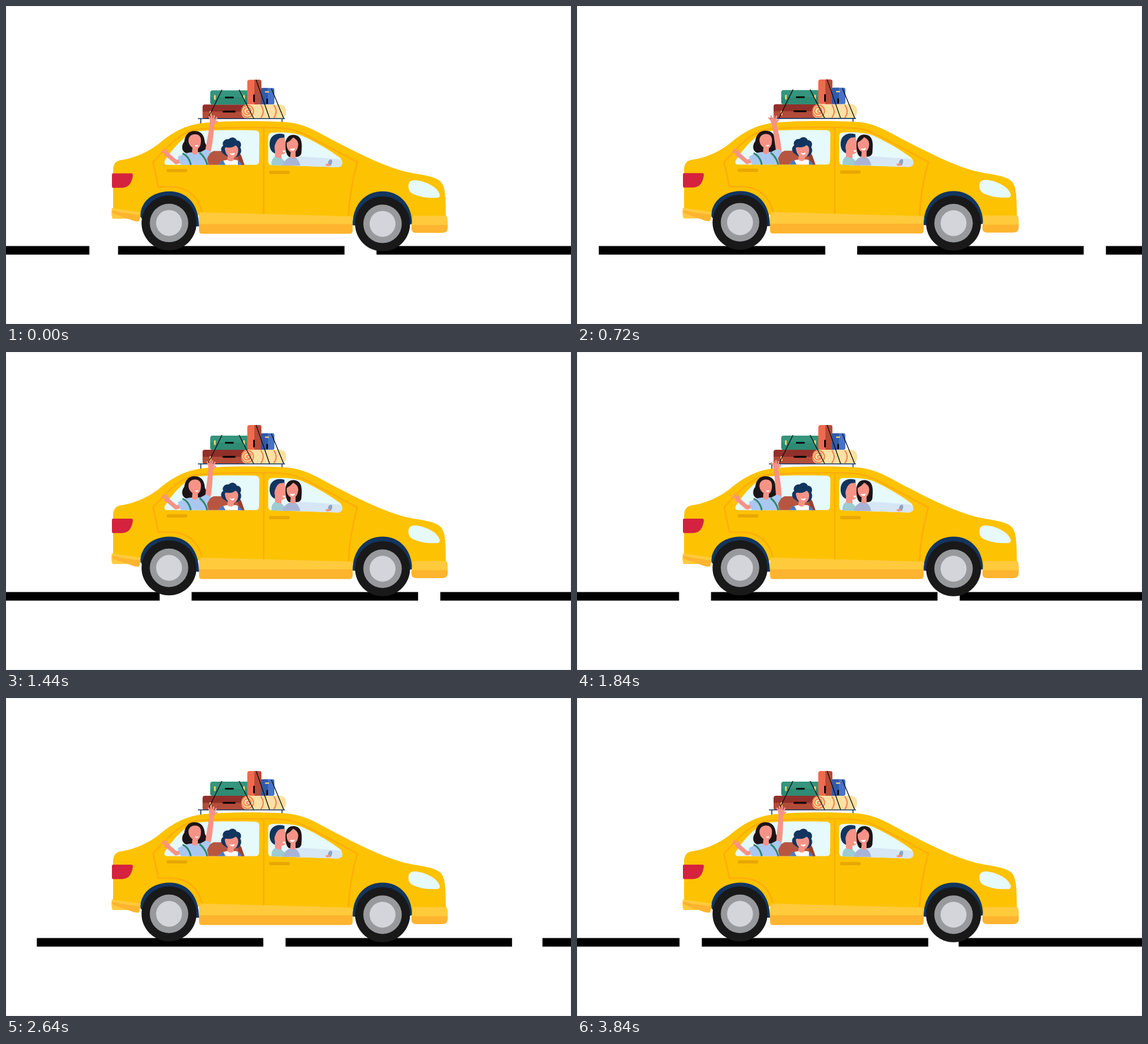
Animation, 960 px wide and 540 px high, one loop 3920 ms. Source, as an HTML page:

```html
<!DOCTYPE html>
<html lang="en">
<head>
<meta charset="utf-8">
<title>Family road trip</title>
<style>
  html, body { margin: 0; width: 100%; height: 100%; overflow: hidden; background: #fff; }
  svg { display: block; width: 960px; height: 540px; }
  .skin { fill: #f69387; }
  .limb { fill: none; stroke: #f69387; stroke-linecap: round; stroke-linejoin: round; }
  .seam { fill: none; stroke: #ffac0c; stroke-width: 2.6; stroke-linejoin: round; }
  .glass { fill: #e6f9fb; }
  .navy { fill: #12355f; }
  .trim { fill: #ffca3c; }
  .under { fill: #feb42e; }
  .smile { fill: #fff; }
  .clasp { fill: #fbd46a; }
  .strap { fill: none; stroke: #111; stroke-width: 1.4; }
  .mat { fill: none; stroke: #f08252; stroke-width: 2; }
</style>
</head>
<body>
<svg viewBox="0 0 960 540">
  <defs>
    <g id="wheel">
      <circle r="46.7" fill="#191919"/>
      <circle r="32.7" fill="#98999d"/>
      <circle r="22" fill="#d3d5da"/>
    </g>
  </defs>
  <rect x=".5" y=".5" width="959" height="539" fill="#fff" stroke="#ebebeb"/>
  <g id="road"></g>

  <g id="body">
    <!-- luggage -->
    <g id="luggage">
      <rect x="334" y="166" width="76" height="24" rx="4" fill="#91302a"/>
      <path d="M334 178H410V190H338Q334 190 334 186Z" fill="#b34b39"/>
      <rect x="368" y="176.5" width="22" height="3" rx="1"/>
      <rect class="clasp" x="346" y="177" width="3" height="8" rx="1"/>
      <rect x="347" y="142" width="66" height="24" rx="4" fill="#35957d"/>
      <path d="M347 154H413V162Q413 166 409 166H351Q347 166 347 162Z" fill="#2e8b74"/>
      <rect x="372" y="152.7" width="15" height="2.8" rx="1"/>
      <rect class="clasp" x="353.5" y="150" width="2.8" height="8" rx="1"/>
      <rect class="clasp" x="403" y="150" width="2.8" height="8" rx="1"/>
      <rect x="410" y="124" width="24" height="42" rx="4" fill="#f06a4e"/>
      <path d="M422 124H430Q434 124 434 128V166H422Z" fill="#b64b39"/>
      <rect x="420" y="149" width="2.8" height="13" rx="1"/>
      <rect x="433" y="138" width="23" height="28" rx="3" fill="#4672c8"/>
      <path d="M433 141Q433 138 436 138H445V166H433Z" fill="#315aab"/>
      <rect class="clasp" x="440" y="143.5" width="7" height="2.2" rx="1"/>
      <rect x="442.5" y="156" width="2.6" height="9" rx="1"/>
      <rect x="400" y="166" width="76" height="24" rx="10" fill="#fde0a3"/>
      <circle cx="410.5" cy="177.5" r="10" class="mat"/>
      <path class="mat" d="M415 181C410 186 403 182 404 176C406 169 417 170 416 177C415 182 408 181 409 177C410 175 412 175 413 177M433 167Q441 178 433 189M455 167Q463 178 455 189"/>
      <path class="strap" d="M367 141L343 190M396 141L421 190M425 124L448 190M451 139L472 190"/>
      <path d="M326 190H474M331 190V199M469 190V199" fill="none" stroke="#17375f" stroke-width="1.6"/>
    </g>

    <!-- shell -->
    <path fill="#fdc202" d="M182 348V277Q182 261 198 260C221 256 243 246 261 231.500C284 212 306 201.500 330 198C368 193.500 434 193.500 476 196C507 198 529 213 560 229C595 247 637 269 678 280C705 286 728 286.500 739 297.500C746 306 747 318 747.500 358V368H689L580 358L330 354H229Z"/>
    <path class="navy" d="M228 356C229 329 251 313.500 278 313.500C307 313.500 328 335 328 373H240ZM589 371C589 336 610 313.500 640 313.500C669 313.500 690 336 690 369L640 378Z"/>
    <path class="trim" d="M180 342L229 349L227 360H181Q178 352 180 342Z"/>
    <path class="under" d="M180 347Q184 345 193 349L229 354L226 364Q222 366 210 361L184 352Q180 350 180 347Z"/>
    <path class="trim" d="M331 349L589 356V372H328V352Z"/>
    <path class="under" d="M328 369H589V380Q589 385.500 584 385.500H333Q328 385.500 328 380Z"/>
    <path class="trim" d="M691 355H748Q751 356 750.500 372H689Z"/>
    <path class="under" d="M689 370.500H750.500V376Q750 384 741 384H697Q689 384 689 377Z"/>
    <path class="seam" d="M333 349C327 322 308 306 280 306H259L250 264C274 237 298 211 327 208C370 205 438 204 472 206.500C496 208 512 219 597 264C588 296 583 328 582 355M438 206V352"/>
    <rect x="273" y="275.500" width="35" height="5.500" rx="2" fill="#e8a703"/>
    <rect x="447" y="278.500" width="35" height="5.500" rx="2" fill="#e8a703"/>
    <path fill="#d5223e" d="M180 285Q180 283 182 283H213Q216 283 215.500 287C213 301 208 307 197 307.500H182Q180 307.500 180 305Z"/>
    <path class="glass" d="M684 302C685 294 694 293 705 296C720 300 734 308 737 319Q738 325 730 324.500C715 325 703 323 692 318C685 315 683 309 684 302Z"/>
    <path class="glass" d="M274 268.500Q267 268.500 270 261C284 240 302 219 322 212C345 209 395 209.500 424 210Q430.500 210.500 430.500 217L430 262Q430 268.500 424 268.500Z"/>
    <path class="glass" d="M445.500 220Q446 214 452 214C472 213 490 214 503 219C527 230 551 244 568 257C574 264 572 272.500 563 272.500L451 269Q445.500 269 445.500 262Z"/>

    <!-- back seat -->
    <path fill="#b65641" d="M340 268.500C340 257 344 248 353 245H388Q397 246 400 254L405 268.500Z"/>
    <path fill="#98402f" d="M391 246Q398 248 400 254L405 268.500H398Z"/>
    <path fill="#1c1518" d="M320 211C308 211 304 221 303 229C297 236 298 248 309 249H332C342 248 343 238 338 231C337 218 332 211 320 211Z"/>
    <path class="limb" stroke-width="7" d="M275 252L289 264L301 260"/>
    <path class="limb" stroke-width="2.5" d="M274 251L265 246M275 250L267 242.500M277 251L273 243M275 254L270 252"/>
    <path fill="#a9c8f1" d="M292 255Q306 247 317 247H330L340 242L348 247L341 255L344 268.500H297Z"/>
    <path d="M300 249Q311 254 314 268.500M329 248Q339 256 342 268.500" fill="none" stroke="#31866f" stroke-width="3"/>
    <path class="skin" d="M317 237H326V248Q321 254 316 248ZM310 226C311 219 317 215 325 217C331 219 332 225 331 231C330 240 325 243 320 241C313 238 310 233 310 226Z"/>
    <path class="smile" d="M321 235Q325 236 327 234.500Q326.500 238 323.500 237.500Q321.500 237 321 235Z"/>

    <path class="navy" d="M371 251C364 247 364 239 369 236C366 229 373 224 378 225C384 219 391 223 392 227C399 227 401 234 398 239C402 245 398 253 392 255H377Z"/>
    <path fill="#fff" d="M361 268.500Q364 261 376 260H391Q398 262 400 268.500Z"/>
    <path fill="#4d79bd" d="M361 268.500Q364 262 369 261L373 268.500ZM394 261Q399 263 401 268.500H394Z"/>
    <path class="skin" d="M377 251H387V260Q382 265 376 260ZM372 242Q371 238 376 239Q385 240 390 235.500Q395 238 394.500 245C393.500 254 388 258 382 256C376 254 373 249 372 242Z"/>
    <path class="smile" d="M380 248.500Q384 250 388.500 248Q388 252 385 252Q381 251.500 380 248.500Z"/>

    <!-- front seats -->
    <path fill="#d6e6f5" d="M494 254Q530 256 567 259Q573 264 571 268Q569 272.500 563 272.500L490 270Z"/>
    <path fill="#8fa4c0" d="M547 267Q547 260 552 259Q555 260 554 265L552 270H547Z"/>
    <path class="skin" d="M542 268L548 266L552 269.500L546 271Z"/>
    <path class="navy" d="M473 217C461 213 449 218 448 231C447 241 452 249 460 250L474 235Z"/>
    <path class="skin" d="M458 232Q460 226 465 223L473 222Q477 233 476 244Q475 251 468 251V260H457V244Q455 238 458 232Z"/>
    <path fill="#9dcbd1" d="M451 269Q451 257 457 255L469 258L481 270Z"/>
    <path class="smile" d="M469.500 244.500L475 243.500Q474.500 247.500 472 247.500Z"/>
    <path fill="#1c1518" d="M475 231C476 220 484 216 492 218C504 221 503 235 502 247Q502 254 494 255H481Q474 251 475 231Z"/>
    <path fill="#a9b4d5" d="M470 269.500Q474 257 484 255H491Q498 260 500 270Z"/>
    <path class="skin" d="M484 243H492V255Q487 260 483 255ZM477 231Q483 228 488 222Q496 226 496.500 233C496.500 242 492 248 487 247.500C480 247 476 240 477 231Z"/>
    <path class="smile" d="M482 241Q487 242 491 240Q490 244.500 486.500 244.500Q483 244 482 241Z"/>

    <!-- waving arm -->
    <g id="arm">
      <path class="skin" d="M338.500 245C338 229 339 212 338.500 199H346C347.500 215 349 231 347.500 246Q343 250 338.500 245Z"/>
      <path class="skin" d="M336.500 190Q342 187 348 191L346.500 200H338.500Z"/>
      <path class="limb" stroke-width="2.600" d="M338.500 192L335 187.500M340.500 191L339 185M343 191L343.500 184.500M346 192L348 186.500M346 197L350 193"/>
    </g>
    <path fill="#a9c8f1" d="M333 247L339 242Q344 243 348 246L342 257Z"/>
  </g>

  <use href="#wheel" class="wheel" data-x="277" data-y="366.300"/>
  <use href="#wheel" class="wheel" data-x="639.800" data-y="367.800"/>
</svg>

<script>
  const LOOP = 3920, STEP = 80, ROAD_SPEED = 7.305;
  const get = id => document.getElementById(id);
  const road = get('road'), body = get('body'), arm = get('arm');
  const wheels = document.querySelectorAll('.wheel');

  for (const x of [-243.2, 190.4, 629.5, 1052.1, 1488.6]) {
    const dash = document.createElementNS('http://www.w3.org/2000/svg', 'rect');
    const box = { x, y: 407.6, width: 384.8, height: 14.6 };
    for (const key in box) dash.setAttribute(key, box[key]);
    road.append(dash);
  }

  // Vertical bounce of the shell: [tick, offset]
  const BOUNCE = [[0, 1.2], [7, 0], [11, -1.1], [16, -2], [19, 0], [26, 3], [31, 4.6], [36, 1.2]];

  function bounce(tick) {
    const p = tick % 36;
    const i = BOUNCE.findIndex(key => key[0] > p);
    const [t0, y0] = BOUNCE[i - 1], [t1, y1] = BOUNCE[i];
    return y0 + (y1 - y0) * (p - t0) / (t1 - t0);
  }

  // Triangle wave from 1 to -1 and back
  function swing(tick, period) {
    const p = ((tick % period) + period) % period / period;
    return Math.abs(p - 0.5) * 4 - 1;
  }

  function draw(now) {
    const n = Math.floor(now % LOOP / STEP);
    // 30 ticks a second, sampled once per step
    const tick = Math.max(0, Math.ceil(n * 12 / 5) - 1);
    road.setAttribute('transform', `translate(${-ROAD_SPEED * tick} 0)`);
    body.setAttribute('transform', `translate(0 ${bounce(tick)})`);
    arm.setAttribute('transform', `rotate(${9.7 * swing(tick, 40)} 343 246)`);
    const hop = 0.2 + 2.3 * swing(tick - 1, 24);
    for (const w of wheels)
      w.setAttribute('transform', `translate(${w.dataset.x} ${+w.dataset.y + hop})`);
  }

  const start = performance.now();
  function loop() {
    draw(performance.now() - start);
    requestAnimationFrame(loop);
  }
  loop();
</script>
</body>
</html>
```
